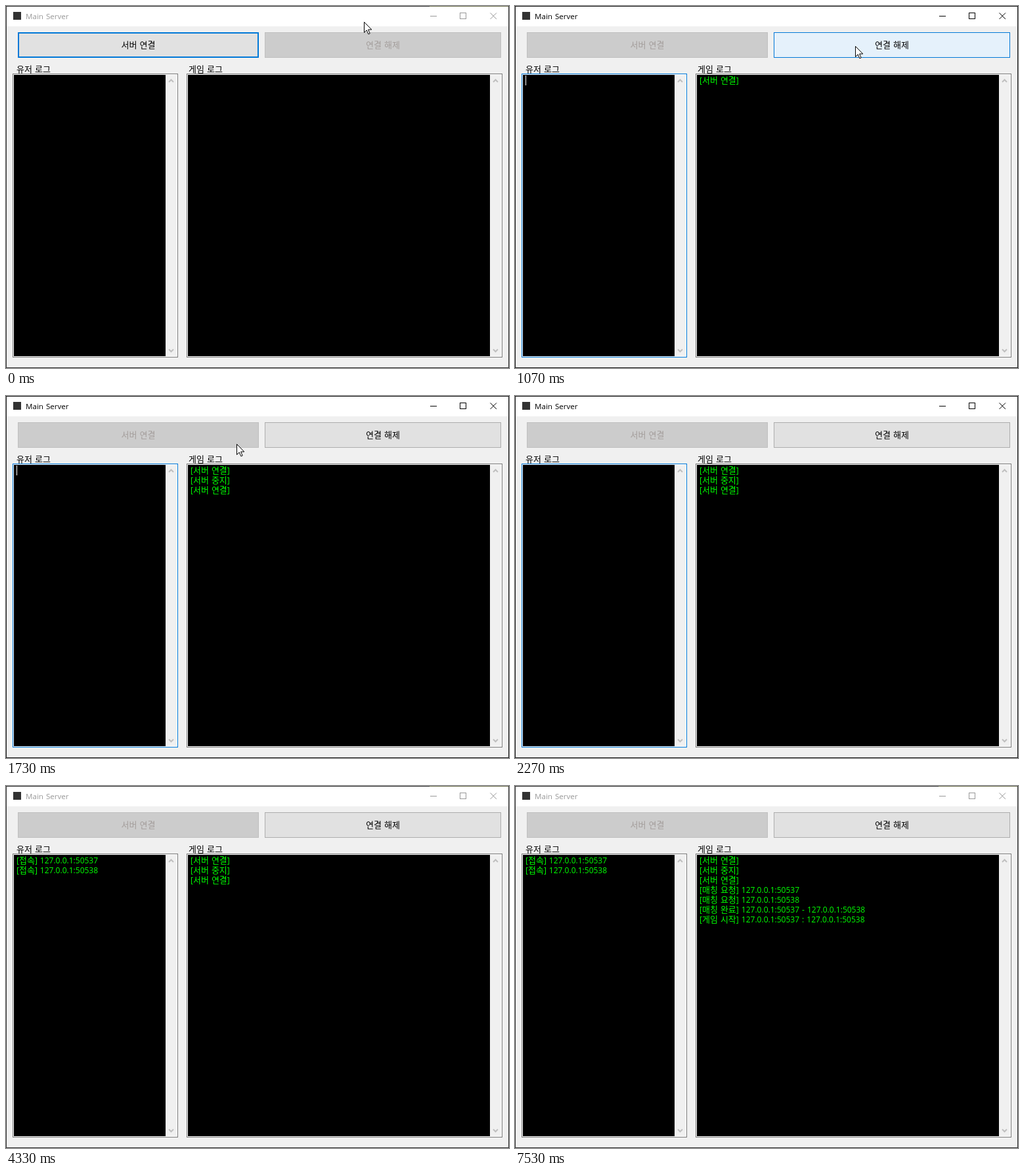
An HTML page for the animation above (8000 ms loop, 766 by 552 pixels).

```html
<!DOCTYPE html>
<html lang="ko">
<head>
<meta charset="utf-8">
<title>Main Server</title>
<style>
  html, body { margin: 0; width: 100%; height: 100%; overflow: hidden; background: #f0f0f0; }
  svg { display: block; }
  text { font: 12px "Open Sans", "Noto Sans CJK KR", sans-serif; word-spacing: .9px; white-space: pre; }
  .ko { font: 13px "Noto Sans CJK KR", "Noto Sans CJK", sans-serif; }
  .mid { text-anchor: middle; }
  .log { fill: #0f0; }
  .glyph { fill: none; shape-rendering: crispEdges; }
  .chevron { fill: none; stroke: #bfbfbf; stroke-width: 2; }
</style>
</head>
<body>
<svg id="stage" width="766" height="552" viewBox="0 0 766 552"></svg>
<script>
const LOOP = 8000, FADE = 90, FPS = 15;
const stage = document.getElementById('stage');

// fill, border, inner border, text
const STATES = {
  initial: ['#e1e1e1', '#0078d7', '#0078d7', '#000'],
  normal: ['#e1e1e1', '#adadad', '#e1e1e1', '#000'],
  hover: ['#e5f1fb', '#0078d7', '#e5f1fb', '#000'],
  disabled: ['#cccccc', '#bfbfbf', '#cccccc', '#a39d9b']
};
const CONNECT = [[0, 'initial'], [270, 'hover'], [530, 'disabled'], [1260, 'normal'], [1510, 'hover'], [1590, 'disabled']];
const RELEASE = [[0, 'disabled'], [390, 'normal'], [770, 'hover'], [1260, 'disabled'], [1590, 'normal'], [1770, 'hover'], [2030, 'normal']];
const FOCUS = [[0, '#7a7a7a'], [540, '#0078d7'], [2795, '#7a7a7a']];
const CARET = [[600, 1130], [1260, 2265]];
const ACTIVE = [390, 2795];

// time, x, y of the pointer tip
const POINTER = [
  [0, 545, 24], [400, 322, 57], [533, 317, 58], [667, 340, 58], [867, 460, 60], [1067, 518, 61],
  [1267, 520, 62], [1467, 386, 80], [1600, 353, 73], [1733, 351, 73], [1867, 425, 66], [2060, 425, 66]
];

const A = '127.0.0.1:50537', B = '127.0.0.1:50538';
const USER_LOG = [[2865, `[접속] ${A}`], [4330, `[접속] ${B}`]];
const GAME_LOG = [
  [390, '[서버 연결]'], [1260, '[서버 중지]'], [1590, '[서버 연결]'],
  [6130, `[매칭 요청] ${A}`], [7530, `[매칭 요청] ${B}`],
  [7530, `[매칭 완료] ${A} - ${B}`], [7530, `[게임 시작] ${A} : ${B}`]
];

function add(tag, attrs, content = '') {
  const el = document.createElementNS('http://www.w3.org/2000/svg', tag);
  for (const key in attrs) el.setAttribute(key, attrs[key]);
  el.innerHTML = content;
  return stage.appendChild(el);
}
const rect = (x, y, width, height, fill) => add('rect', { x, y, width, height, fill });
const frame = (x, y, w, h, stroke, fill = 'none') =>
  add('rect', { x: x + .5, y: y + .5, width: w - 1, height: h - 1, stroke, fill });
const label = (x, y, str, cls = '') =>
  add('text', { x, y, class: cls }, str.replace(/[가-힣]+/g, '<tspan class="ko">$&</tspan>'));
const path = (d, attrs) => add('path', { d, ...attrs });

function button(x, w, str, timeline) {
  const outer = frame(x, 40, w, 39, '#000');
  const inner = frame(x + 1, 41, w - 2, 37, '#000');
  const text = label(x + w / 2, 64, str, 'mid');
  return t => {
    const [from, to, p] = blend(timeline, t);
    const [fill, border, inset] = STATES[to].map((c, i) => mix(STATES[from][i], c, p));
    outer.style.fill = fill;
    outer.style.stroke = border;
    inner.style.stroke = inset;
    text.style.fill = STATES[to][3];
  };
}

function logBox(x, w, lines) {
  const border = frame(x, 103, w, 433, '#7a7a7a', '#fff');
  rect(x + 2, 105, w - 21, 429, '#000');
  rect(x + w - 19, 105, 17, 429, '#f0f0f0');
  const cx = x + w - 10.5;
  path(`M${cx - 3.5} 116l3.5-3.5 3.5 3.5M${cx - 3.5} 523.5l3.5 3.5 3.5-3.5`, { class: 'chevron' });
  const rows = lines.map(([time, str], i) => [time, label(x + 6, 118 + 15 * i, str, 'log')]);
  return { border, draw: t => rows.forEach(([time, el]) => show(el, t >= time)) };
}

const show = (el, on) => { el.style.display = on ? '' : 'none'; };
const mix = (a, b, p) => `color-mix(in srgb, ${b} ${p * 100}%, ${a})`;

// previous value, current value and how far the change has come
function blend(timeline, t) {
  const i = timeline.findLastIndex(([time]) => time <= t);
  const [time, to] = timeline[i];
  return i ? [timeline[i - 1][1], to, Math.min(1, (t - time) / FADE)] : [to, to, 1];
}

function pointerAt(t) {
  const i = POINTER.findIndex(([time]) => time > t);
  if (i < 0) return null;
  const [t0, x0, y0] = POINTER[i - 1], [t1, x1, y1] = POINTER[i];
  const p = (t - t0) / (t1 - t0);
  return [x0 + (x1 - x0) * p, y0 + (y1 - y0) * p].map(Math.round);
}

rect(0, 0, 766, 552, '#f0f0f0');
rect(0, 0, 766, 31, '#fff');
const edge = frame(0, 0, 766, 552, '#222');
const edgeTint = rect(645, 0, 120, 1, '#6f7150');
rect(11, 9, 12, 12, '#333');
const title = label(30, 20, 'Main Server');
title.style.fontSize = '11.6px';
const controls = [
  path('M646 15.5h10M691.5 10.5h9v9h-9z', { class: 'glyph' }),
  path('M737.5 10.5l9.5 9.5M747 10.5l-9.5 9.5', { fill: 'none' })
];
const buttons = [button(18, 367, '서버 연결', CONNECT), button(394, 360, '연결 해제', RELEASE)];
label(16, 100.5, '유저 로그');
label(278, 100.5, '게임 로그');
const userBox = logBox(10, 252, USER_LOG);
const gameBox = logBox(275, 481, GAME_LOG);
const caret = rect(16, 106, 1, 15, '#fff');
const pointer = path('M.5.5v16l3.7-3.6 2.7 6 2.3-1-2.6-5.9h5.2z', { fill: '#fff', stroke: '#000' });

function draw(now) {
  // The screen is sampled at a fixed rate
  const t = Math.floor((now % LOOP + 5) * FPS / 1000) * 1000 / FPS;
  const active = t >= ACTIVE[0] && t < ACTIVE[1];
  const ink = active ? '#000' : '#999';
  title.style.fill = ink;
  controls.forEach(el => { el.style.stroke = ink; });
  edge.style.stroke = active ? '#1a1a1a' : '#333';
  show(edgeTint, !active);

  buttons.forEach(paint => paint(t));
  userBox.border.style.stroke = mix(...blend(FOCUS, t));
  userBox.draw(t);
  gameBox.draw(t);
  show(caret, CARET.some(([on, off]) => t >= on && t < off));

  const tip = pointerAt(t);
  show(pointer, tip);
  if (tip) pointer.setAttribute('transform', `translate(${tip})`);
}

const start = performance.now();
function tick() {
  draw(performance.now() - start);
  requestAnimationFrame(tick);
}
tick();
</script>
</body>
</html>
```
